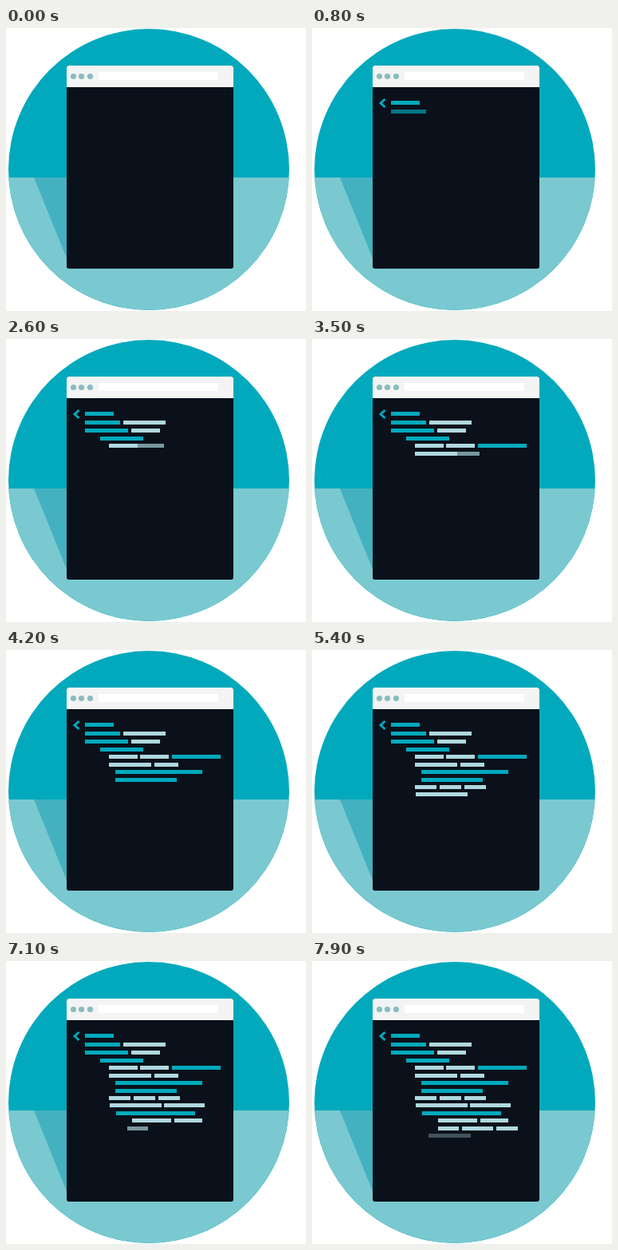
These frames come from a looping animation (376x354 px, 8000 ms). An HTML page:

```html
<!DOCTYPE html>
<html lang="en">
<head>
<meta charset="utf-8">
<title>Code window</title>
<style>
html, body { margin: 0; width: 100%; height: 100%; overflow: hidden; background: #fff; }
svg { display: block; }
</style>
</head>
<body>
<svg width="376" height="354" viewBox="0 0 376 354">
  <circle cx="179" cy="177" r="176" fill="#02a9bc"/>
  <path d="M3.3 187A176 176 0 0 0 354.7 187Z" fill="#7ac9d0"/>
  <path d="M35 187H76V288Z" fill="#44b1c0"/>
  <rect x="76" y="47" width="209" height="254" rx="3" fill="#0a111b"/>
  <path d="M76 74V50a3 3 0 0 1 3-3H282a3 3 0 0 1 3 3V74Z" fill="#f3f4f3"/>
  <g fill="#8abcc0">
    <circle cx="84.5" cy="60.5" r="3.6"/>
    <circle cx="94.5" cy="60.5" r="3.6"/>
    <circle cx="105.5" cy="60.5" r="3.6"/>
  </g>
  <rect x="116" y="55" width="150" height="10" fill="#fff"/>
  <g id="code">
    <path d="M91.5 89L86 94L91.5 99" fill="none" stroke="#02a9bc" stroke-width="3"/>
  </g>
</svg>
<script>
const STEP = 100, LOOP = 8000, STEPS_PER_ITEM = 3, SLIDE = 18, FIRST_SLIDING = 6;
const TEAL = '#02a9bc', PALE = '#b0d8df';

// Bars in order of appearance: x, y, width, colour
const bars = [
  [99, 91, 36, TEAL],
  [99, 102, 44, TEAL], [147, 102, 53, PALE],
  [99, 112, 54, TEAL], [157, 112, 36, PALE],
  [118, 122, 54, TEAL],
  [129, 131, 36, PALE], [168, 131, 36, PALE], [208, 131, 61, TEAL],
  [129, 141, 53, PALE], [186, 141, 30, PALE],
  [137, 150, 109, TEAL],
  [137, 160, 77, TEAL],
  [129, 169, 27, PALE], [160, 169, 27, PALE], [191, 169, 27, PALE],
  [130, 178, 65, PALE], [198, 178, 51, PALE],
  [138, 188, 50, TEAL], [188, 188, 49, TEAL],
  [158, 197, 49, PALE], [211, 197, 35, PALE],
  [158, 207, 26, PALE], [188, 207, 39, PALE], [231, 207, 27, PALE],
  [158, 216, 53, PALE]
];

const code = document.getElementById('code');
for (const [x, y, width, fill] of bars) {
  const bar = document.createElementNS(code.namespaceURI, 'rect');
  const attrs = { x, y, width, height: 5, fill };
  for (const name in attrs) bar.setAttribute(name, attrs[name]);
  code.append(bar);
}
const items = [...code.children];

function draw(now) {
  const step = Math.floor(now % LOOP / STEP);
  items.forEach((item, i) => {
    const shown = Math.min(1, Math.max(0, step / STEPS_PER_ITEM - i));
    const shift = i < FIRST_SLIDING ? 0 : Math.round((shown - 1) * SLIDE);
    item.setAttribute('opacity', shown);
    item.setAttribute('transform', `translate(${shift} 0)`);
  });
}

const start = performance.now();
function tick() {
  draw(performance.now() - start);
  requestAnimationFrame(tick);
}
tick();
</script>
</body>
</html>
```
